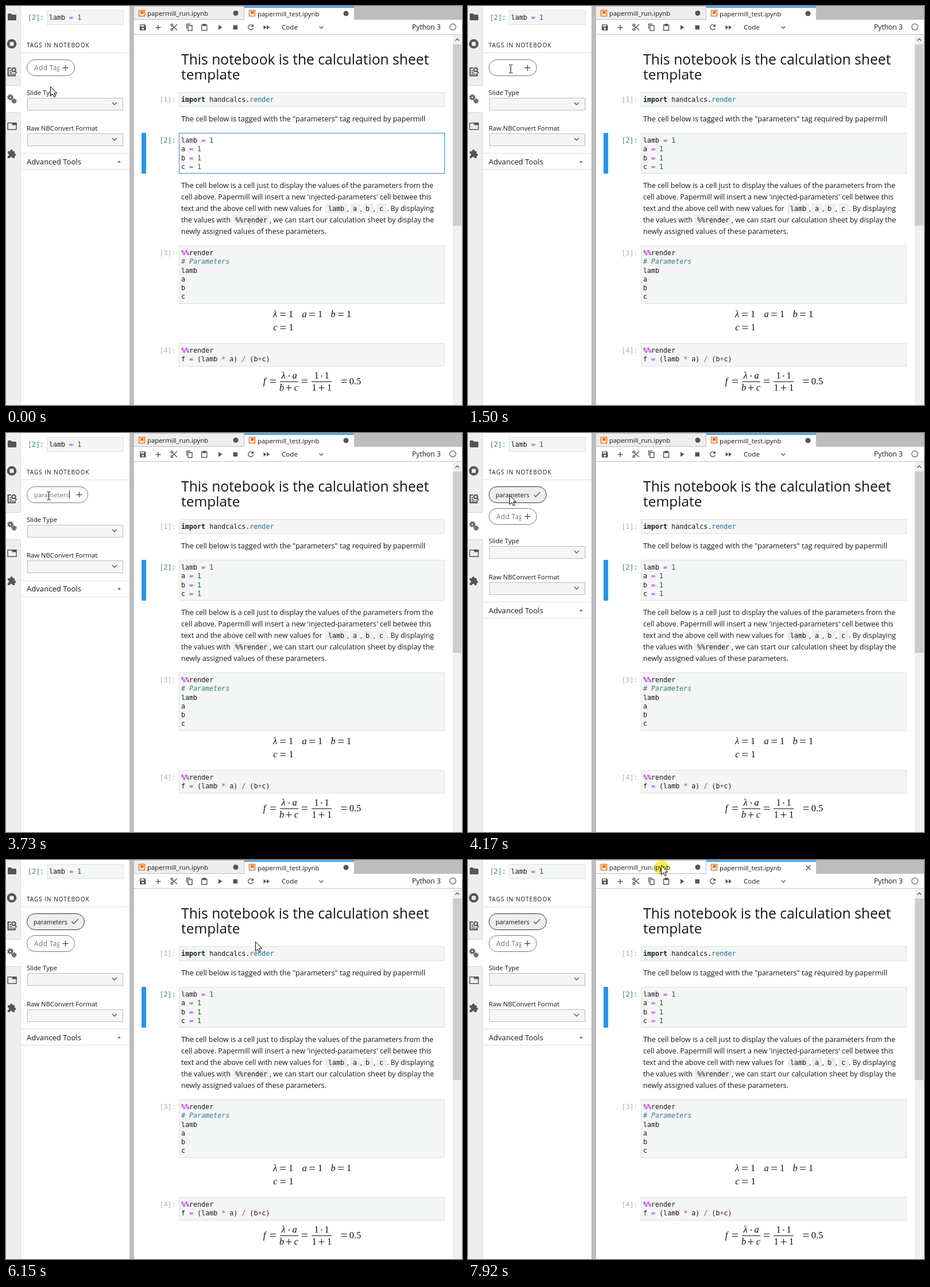
An HTML page that plays this animation: 794 by 695 pixels, repeating every 8000 ms.

```html
<!DOCTYPE html>
<html lang="en">
<head>
<meta charset="utf-8">
<title>Notebook tagging</title>
<style>
html, body { margin: 0; width: 100%; height: 100%; overflow: hidden; background: #fff; }
svg { display: block; }
#stage { width: 100vw; height: 100vh; }
text { font-family: "Open Sans", "Noto Sans", sans-serif; fill: #161616; white-space: pre; }
.code { font-family: "DejaVu Sans Mono", monospace; font-size: 11.66px; }
.math { font-family: "Liberation Serif", serif; font-size: 16.5px; text-anchor: middle; fill: #111; }
.it { font-style: italic; }
.op { fill: #a2f; }
.magic { fill: #a2f; font-weight: bold; }
.num { fill: #0a6a0a; }
.kw { fill: #14261a; font-weight: bold; }
.prop { fill: #22689a; }
.rem { fill: #3b7888; font-style: italic; }
.prompt { fill: #b3b0ac; }
.on { fill: #307fa8; }
.icon { fill: #555; }
.line { fill: none; stroke: #555; stroke-width: 1.4; }
.bold { stroke-width: 2.2; }
.faint { fill: #757575; }
</style>
</head>
<body>
<svg id="stage" viewBox="0 0 794 695" xmlns="http://www.w3.org/2000/svg"></svg>
<script>
const LOOP = 8000;
const stage = document.getElementById('stage');

// ---- markup helpers
const rect = (x, y, w, h, fill, more = '') =>
  `<rect x="${x}" y="${y}" width="${w}" height="${h}" fill="${fill}" ${more}/>`;
const box = (x, y, w, h, fill, stroke, more = '') =>
  rect(x + .5, y + .5, w - 1, h - 1, fill, `stroke="${stroke}" ${more}`);
const path = (d, cls = 'icon') => `<path class="${cls}" d="${d}"/>`;
const dot = (x, y, r, cls = 'icon') => `<circle cx="${x}" cy="${y}" r="${r}" class="${cls}"/>`;
const text = (x, y, size, s, more = '') =>
  `<text x="${x}" y="${y}" font-size="${size}" ${more}>${s}</text>`;
const para = (x, y, s, size = 12.6) => text(x, y, size, s);
const code = (x, y, s, cls = '') => `<text class="code ${cls}" x="${x}" y="${y}">${s}</text>`;
const paint = s => s.replace(/(%%)|([=*\/+])|(\d)/g,
  (m, magic, op) => `<tspan class="${magic ? 'magic' : op ? 'op' : 'num'}">${m}</tspan>`);
const lines = (y, list) => list.map((s, i) =>
  s[0] === '#' ? code(305, y + i * 15.25, s, 'rem') : code(305, y + i * 15.25, paint(s))).join('');
const chevron = (x, y) => path(`M${x - 4} ${y - 2}l4 4l4-4`, 'line');
const chip = (x, y, w, s) => rect(x, y - 13, w, 17, '#eee') + code(x + 5, y, s);
const cell = (y, h, n) =>
  box(301, y, 463, h, '#f4f5f5', '#dfe1e1') + code(267.5, y + 17, `[${n}]:`, n === 2 ? 'on' : 'prompt');

// ---- left side
function sidebar() {
  const gear = (x, y, r) => dot(x, y, r, 'line bold') +
    `<circle cx="${x}" cy="${y}" r="${r + 1.7}" class="line bold" stroke-dasharray="${(r + 1.7) * Math.PI / 8}"/>`;
  return rect(0, 0, 26, 695, '#eee') + rect(25, 0, 1, 695, '#dcdcdc') +
    rect(0, 138, 26, 48, '#fff') + rect(0, 138, 25, 1, '#d4d4d4') + rect(0, 185, 25, 1, '#d4d4d4') +
    path('M3 14.5q0-1.5 1.5-1.5h4l2 2h6q1.5 0 1.5 1.5v7q0 1.5-1.5 1.5h-12q-1.5 0-1.5-1.5z') +
    dot(10, 66, 8.3) + rect(6.5, 62.5, 7, 7, '#eee') +
    path('M9 108H3.7v13.3h12V117.5', 'line bold') + path('M6 112.5h3M6 115.5h4.5M6 118.5h7.5', 'line') +
    dot(13.5, 111, 3.2, 'line bold') + path('M15.5 113.5l3 3.5', 'line bold') +
    gear(7.5, 159, 2.7) + gear(14, 165.5, 1.9) +
    path('M3 203.7h15v11.6H3z', 'line') + rect(10.5, 203, 8, 4.5, '#555') +
    path('M3 253h4.2a2.3 2.3 0 1 1 4.4 0H15v4a2.3 2.3 0 1 1 0 4.6V265h-3.6a2.3 2.3 0 0 0-4.6 0H3v-3.6a2.3 2.3 0 0 0 0-4.6z');
}

function panel() {
  const select = (y, label) => text(36, y - 5.5, 11.3, label) +
    box(37, y, 167, 22, '#f4f5f5', '#bdbdbd') + chevron(189, y + 10);
  return rect(26, 0, 189, 695, '#fff') +
    code(38, 24, '[2]:', 'on') + box(71, 7, 134, 26, '#f4f5f5', '#dfe1e1') + code(75, 24, paint('lamb = 1')) +
    text(36, 72, 10, 'TAGS IN NOTEBOOK', 'letter-spacing="1"') + rect(26, 81, 189, 1, '#e0e0e0') +
    `<g id="tag">${box(36, 93, 101, 29, '#eee', '#333', 'rx="14"')}` +
    text(48, 111.5, 10.9, 'parameters') + path('M114.5 107.5l3.5 3.5l7.5-8', 'line') + '</g>' +
    `<g id="slide">${select(160, 'Slide Type')}</g>` +
    '<g id="lower">' +
    '<rect id="pill" x="36.5" y="93.5" height="28" rx="14" fill="#fff" stroke="#757575"/>' +
    '<svg id="hint" x="49" y="94" width="44" height="27">' +
    text(0, 18, 12, 'Add Tag', 'class="faint" letter-spacing=".35"') + '</svg>' +
    text(49, 111.5, 11.25, '', 'id="typed" class="faint"') +
    rect(0, 100, 1, 14, '#222', 'id="caret"') +
    '<path id="plus" class="line" d="M-5 107.5H5M0 102.5V112.5"/>' +
    select(222, 'Raw NBConvert Format') +
    rect(26, 256, 189, 1, '#e0e0e0') + text(36, 276, 13.1, 'Advanced Tools') +
    path('M194 272.5l3-3l3 3z') + rect(26, 284, 189, 1, '#e0e0e0') + '</g>';
}

// ---- tabs and toolbar
function header() {
  const book = x => box(x, 7, 11, 11, '#fff', '#ef6c00', 'stroke-width="1.4"') +
    `<path d="M${x + 3} 9h5.5v6l-2.7-2l-2.8 2z" fill="#ef6c00"/>`;
  return rect(215, 0, 579, 50, '#bdbdbd') + rect(215, 0, 8, 695, '#bdbdbd') +
    rect(223, 1, 191, 22, '#eee', 'id="tab"') + rect(415, 1, 191, 23, '#fff') + rect(415, 1, 191, 2, '#2196f3') +
    book(231) + text(246, 17, 11.35, 'papermill_run.ipynb') + dot(400, 12.5, 4.5) +
    book(423) + text(438, 17.5, 11.35, 'papermill_test.ipynb') +
    `<g id="dirty">${dot(592, 13, 4.5)}</g>` +
    '<path id="close" class="line" d="M588.5 9.5l8 8m0-8l-8 8"/>' +
    rect(223, 24, 571, 26, '#fff') + rect(223, 49, 571, 1, '#c4c4c4') +
    rect(226, 27, 24, 20, '#eee', 'id="hover"') +
    path('M233 33.2q0-1.2 1.2-1.2h7.3l2 2v7.3q0 1.2-1.2 1.2h-8.1q-1.2 0-1.2-1.2z') +
    rect(234.5, 33.3, 6, 2.4, '#fff') + `<circle cx="238.3" cy="39.5" r="1.7" fill="#fff"/>` +
    path('M260.5 37.5h9M265 33v9', 'line') +
    dot(288.8, 33.3, 1.8, 'line') + dot(288.8, 40.7, 1.8, 'line') +
    path('M290 34.5l8 7.5M290 39.5l8-7.5', 'line') +
    path('M314.7 39.5v-8h6.5M317 34h7v8.7h-7z', 'line') +
    path('M340.7 33h9v9.5h-9z', 'line') + rect(342.5, 31, 5.5, 4, '#555') +
    path('M370 33l6.5 4.3l-6.5 4.3z') + rect(395.5, 33.5, 7.5, 7.5, '#555') +
    path('M429.3 34a4.4 4.4 0 1 0 1 4.3', 'line') + path('M431 31.5v4.8h-4.8z') +
    path('M448.5 33.5l5 3.8l-5 3.8zM454 33.5l5 3.8l-5 3.8z') +
    text(480, 41, 11.6, 'Code') + path('M545.5 35.5l3.5 3.5l3.5-3.5', 'line') +
    text(707, 41, 12.1, 'Python 3') +
    '<circle cx="778" cy="36.5" r="5.3" fill="none" stroke="#616161" stroke-width="1.2"/>';
}

// ---- notebook
function math() {
  const tok = (x, y, s) => `<text class="math ${/[a-zλ]/.test(s) ? 'it' : ''}" x="${x}" y="${y}">${s}</text>`;
  const eq = (x, y) => rect(x - 5, y - 2.5, 10, 1, '#111') + rect(x - 5, y + 1.5, 10, 1, '#111');
  const plus = (x, y) => rect(x - 5, y - .5, 10, 1, '#111') + rect(x - .5, y - 5, 1, 10, '#111');
  const mul = (x, y) => `<circle cx="${x}" cy="${y}" r="1.1" fill="#111"/>`;
  const set = (x, y, s) => tok(x, y, s) + eq(x + 13.5, y - 4.5) + tok(x + 27.5, y, '1');
  return set(468.7, 541.5, 'λ') + set(519.5, 541.5, 'a') + set(569.5, 541.5, 'b') + set(469, 564.5, 'c') +
    tok(450, 658.5, 'f') + eq(465, 653.5) + rect(477, 654, 32, 1, '#111') +
    tok(483, 648.5, 'λ') + mul(493, 644.5) + tok(502.5, 648.5, 'a') +
    tok(480, 669.5, 'b') + plus(492.5, 665) + tok(505.5, 669.5, 'c') +
    eq(520, 653.5) + rect(532, 654, 35, 1, '#111') +
    tok(540.5, 648.5, '1') + mul(549.5, 644.5) + tok(558.5, 648.5, '1') +
    tok(536.5, 669.5, '1') + plus(549.5, 665) + tok(563, 669.5, '1') +
    eq(588.5, 653.5) + tok(608, 658.5, '0.5');
}

function notebook() {
  return rect(223, 50, 555, 645, '#fff') +
    rect(778, 50, 16, 645, '#f0f0f0') + rect(778, 67, 15, 316, '#cdcdcd') + path('M782.5 60.5l3.3-3.5l3.3 3.5', 'line') +
    text(305, 102.3, 24.65, 'This notebook is the calculation sheet') + text(305, 128.3, 24.5, 'template') +
    cell(150, 26, 1) +
    code(305, 167, '<tspan class="kw">import</tspan> handcalcs.<tspan class="prop">render</tspan>') +
    para(305, 201, 'The cell below is tagged with the "parameters" tag required by papermill', 12.7) +
    rect(236, 221, 8, 71, '#2196f3', 'rx="1"') + cell(221, 71, 2) +
    box(301, 221, 463, 71, '#fff', '#2f87d0', 'id="edit"') +
    lines(238, ['lamb = 1', 'a = 1', 'b = 1', 'c = 1']) +
    para(305, 317, 'The cell below is a cell just to display the values of the parameters from the') +
    para(305, 337, "cell above. Papermill will insert a new 'injected-parameters' cell betwee this", 12.5) +
    para(305, 357, 'text and the above cell with new values for', 12.45) +
    chip(556, 357, 38, 'lamb') + chip(599, 357, 18, 'a') + chip(621, 357, 19, 'b') + chip(645, 357, 18, 'c') +
    para(594, 357, ',') + para(617, 357, ',') + para(640, 357, ',') + para(663, 357, '. By displaying', 12.4) +
    para(305, 377, 'the values with', 12.3) + chip(394, 377, 65, '%%render') +
    para(459, 377, ', we can start our calculation sheet by display the', 12.55) +
    para(305, 397, 'newly assigned values of these parameters.', 12.5) +
    cell(417, 102, 3) + lines(434, ['%%render', '# Parameters', 'lamb', 'a', 'b', 'c']) +
    cell(587, 41, 4) + lines(604, ['%%render', 'f = (lamb * a) / (b+c)']) + math();
}

const pointers =
  '<circle id="glow" cx="336.5" cy="13" r="12.5" fill="#fff04d" style="mix-blend-mode:multiply"/>' +
  '<path id="arrow" d="M.5 .5V16.5L4.2 13L6.9 18.7L9.3 17.5L6.8 12H11.7Z" fill="#fff" stroke="#000"/>' +
  '<path id="beam" d="M-3 -7H-.8L0 -6.4L.8 -7H3M-3 7H-.8L0 6.4L.8 7H3M0 -6.4V6.4" fill="none" stroke="#000"/>' +
  '<path id="hand" d="M5 14V2.3a1.7 1.7 0 0 1 3.4 0V9q.4-1.3 1.7-1.2 1.5.1 1.5 1.7.5-1 1.6-.8 1.3.2 1.2 1.7.3-.5 1-.4 1 .2 1 1.5V16q0 2.4-1.7 4.4V23.3H6.3V20.8Q4.4 18.8 1 13.6.3 12.2 1.4 11.6 2.9 11 5 14ZM8.4 9v4M11.6 9.6v3.6M14.4 10.6v3" fill="#fff" stroke="#000"/>';

stage.innerHTML = notebook() + sidebar() + panel() + header() + pointers;

// ---- timeline
const moves = [
  [0, 'arrow', 77, 140], [250, 'arrow', 37, 100], [500, 'beam', 74.5, 115.5], [750, 'beam', 74.5, 109.5],
  [2000, 'arrow', 74, 109], [2500, 'beam', 74.5, 109.5], [4170, 'arrow', 72, 108], [5400, 'arrow', 159, 75],
  [5670, 'arrow', 414, 137], [5900, 'beam', 454.5, 206.5], [6150, 'arrow', 434, 142], [6400, 'beam', 334.5, 99.5],
  [6650, 'arrow', 248, 50], [6900, 'hand', 230, 36], [7420, 'hand', 244, 34], [7650, 'arrow', 336, 9]
];
const WORD = 'parameters';
const typing = [[0, 0], [2000, 1], [2250, 3], [2500, 5], [3250, 7], [3500, 9], [3730, 10], [4170, 0]];

const el = id => document.getElementById(id);
const at = (list, t) => list.filter(k => k[0] <= t).pop();
const show = (id, on) => el(id).setAttribute('visibility', on ? 'visible' : 'hidden');
const move = (id, x, y) => el(id).setAttribute('transform', `translate(${x} ${y})`);
const within = (t, a, b) => t >= a && t < b;

function typedWidth(n) {
  el('typed').textContent = WORD.slice(0, n);
  return n ? el('typed').getComputedTextLength() : 0;
}

function draw(t) {
  const [, kind, x, y] = at(moves, t);
  for (const id of ['arrow', 'beam', 'hand']) show(id, id === kind);
  move(kind, x, y);

  // the field grows one letter behind the typing
  const n = at(typing, t)[1];
  const right = n ? Math.round(49 + typedWidth(n - 1) + 38.5) : 120;
  const end = Math.round(49 + typedWidth(n));
  el('pill').setAttribute('width', right - 37);
  move('plus', right - (n ? 15.5 : 16.5), 0);
  el('caret').setAttribute('x', end);

  const tagged = t >= 4170;
  show('caret', within(t, 1000, 1500) || within(t, 2000, 2750) || within(t, 3250, 4170));
  show('hint', t < 1000 || tagged);
  show('edit', t < 1000);
  show('tag', tagged);
  move('slide', 0, tagged ? 37 : 0);
  move('lower', 0, tagged ? 38 : 0);

  show('hover', within(t, 6900, 7650));
  show('dirty', t < 7150);
  show('close', t >= 7150);
  el('tab').setAttribute('fill', t >= 7650 ? '#fff' : '#eee');
  show('glow', t >= 7920);
}

const start = performance.now();
function tick() {
  draw((performance.now() - start) % LOOP);
  requestAnimationFrame(tick);
}
tick();
</script>
</body>
</html>
```
